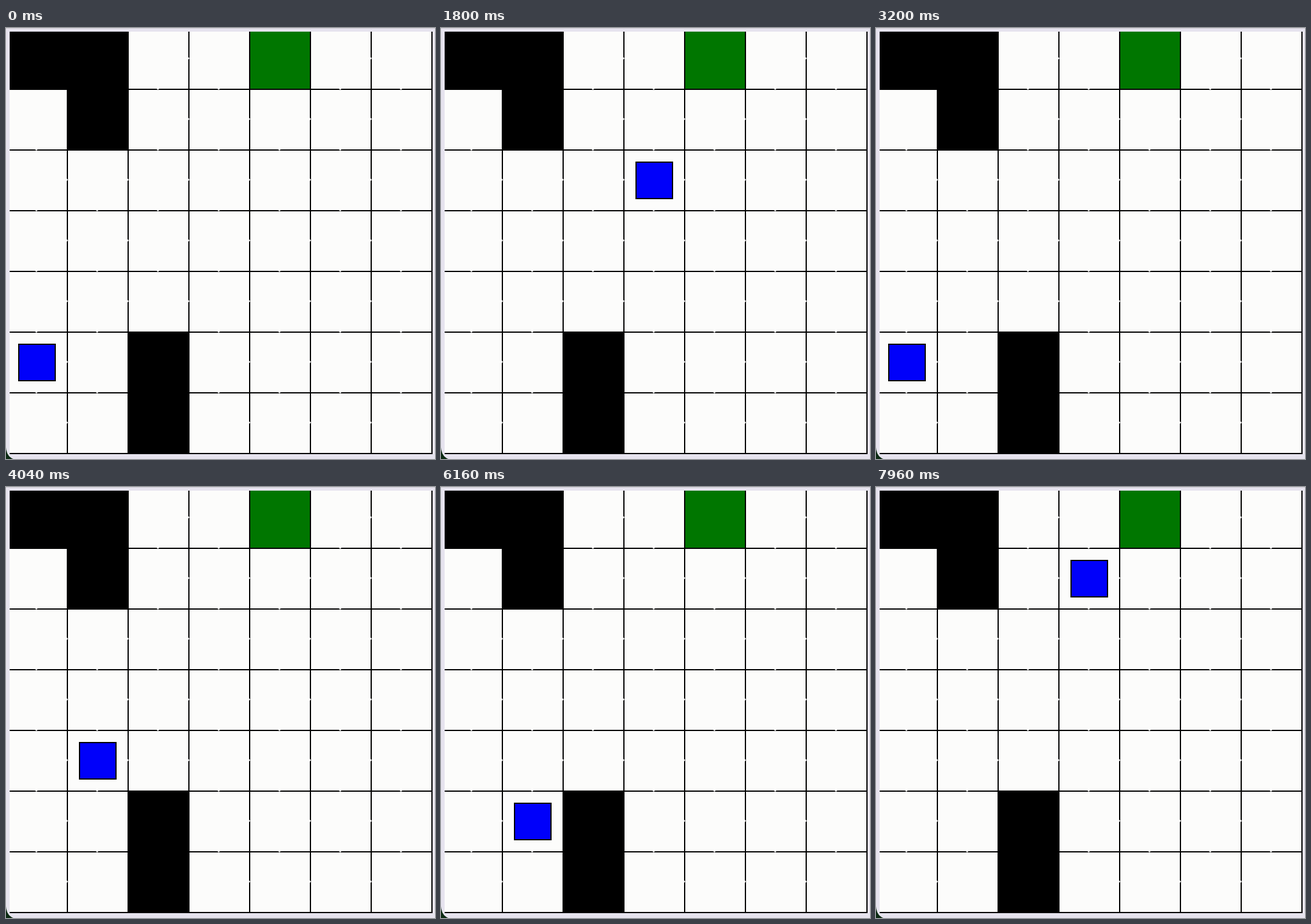
Write a matplotlib script that moves like this. It is 706 px wide and 710 px high and loops after 8 s.

```python
import matplotlib.pyplot as plt
from matplotlib.animation import FuncAnimation
from matplotlib.patches import PathPatch, Polygon, Rectangle
from matplotlib.path import Path

W, H, DPI = 706, 710, 64
CELL, N = 100, 7
INSET = 6            # the board is cropped by the window border
EDGE = N * CELL + 2
LOOP_MS, TICK_MS, STEP_MS = 8000, 20, 140

PAPER, BORDER, RIM = "#fcfcfb", "#e6e3ee", "#cccad2"
GREEN, BLUE, CORNER = "#007600", "#0000fa", "#0b2a12"

WALLS = {(0, 0), (1, 0), (1, 1), (2, 5), (2, 6)}
GOAL = (4, 0)
HOME = (0, 6)

# One letter per step: a direction, "." to stay, "*" to restart.
MOVES = (".U.RURDULURRUU.LDRR.*U.UU.RDUUR..."
         ".RUR..*.R.UL.URUURDU.RU.").replace("....", "...")
DIRS = {"U": (0, -1), "D": (0, 1), "L": (-1, 0), "R": (1, 0), ".": (0, 0)}


def walk(start):
    path = [start]
    for m in MOVES:
        if m == "*":
            path.append(HOME)
        else:
            (x, y), (dx, dy) = path[-1], DIRS[m]
            path.append((x + dx, y + dy))
    return path


fig = plt.figure(figsize=(W / DPI, H / DPI), dpi=DPI, facecolor=BORDER)
ax = fig.add_axes([0, 0, 1, 1])
ax.set_xlim(0, W)
ax.set_ylim(H, 0)
ax.axis("off")


def box(x0, y0, x1, y1, color, z=1):
    r = Rectangle((x0, y0), x1 - x0, y1 - y0, facecolor=color,
                  linewidth=0, antialiased=False, zorder=z)
    return ax.add_patch(r)


def fill_cell(cell, color, near, far):
    x, y = cell[0] * CELL, cell[1] * CELL
    box(max(x + near, INSET), max(y + near, INSET), x + far, y + far, color, 3)


def nick(*pts):
    ax.add_patch(Polygon(pts, facecolor="white", linewidth=0, zorder=4))


# window border
box(0, 0, W, 1, RIM)
corner = Path([(0, 691), (1, 706), (12, H), (0, H), (0, 691)],
              [Path.MOVETO, Path.CURVE3, Path.CURVE3, Path.LINETO, Path.CLOSEPOLY])
ax.add_patch(PathPatch(corner, facecolor=CORNER, linewidth=0))

# board
box(INSET, INSET, EDGE, EDGE, PAPER)
for i in range(1, N + 1):
    p = i * CELL
    box(p, INSET, p + 2, EDGE, "black", 2)
    box(INSET, p, EDGE, p + 2, "black", 2)
for wall in WALLS:
    fill_cell(wall, "black", 0, CELL + 2)
fill_cell(GOAL, GREEN, 2, CELL)

# small white nicks where two open cells meet
solid = WALLS | {GOAL}
for cx in range(N):
    for cy in range(N):
        if (cx, cy) in solid:
            continue
        x, y = cx * CELL, cy * CELL
        mx, my = x + CELL / 2, y + CELL / 2
        if cx and (cx - 1, cy) not in solid:
            nick((x, my - 2), (x, my + 2), (x + 2, my))
        if cy and (cx, cy - 1) not in solid:
            nick((mx - 2, y), (mx + 2, y), (mx, y + 2))

path = walk((0, 5))
shell = box(0, 0, 62, 62, "black", 6)
core = box(0, 0, 58, 58, BLUE, 7)


def draw(i):
    cx, cy = path[i * TICK_MS // STEP_MS]
    x, y = cx * CELL + 20, cy * CELL + 20
    shell.set_xy((x, y))
    core.set_xy((x + 2, y + 2))
    return shell, core


anim = FuncAnimation(fig, draw, frames=LOOP_MS // TICK_MS, interval=TICK_MS,
                     init_func=lambda: draw(0), repeat=True, repeat_delay=0,
                     blit=False)
plt.show()
```
